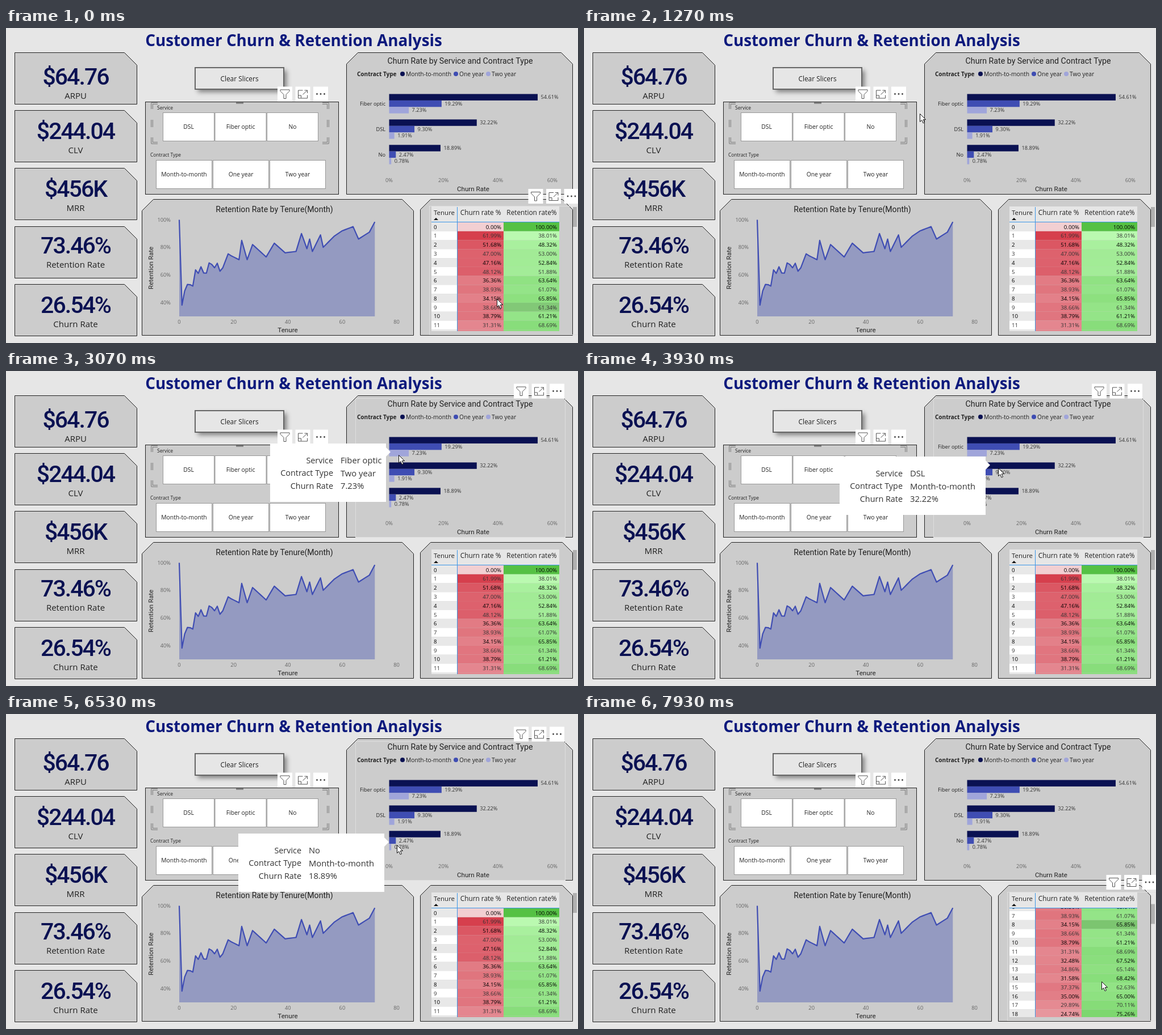
Write an HTML page with a canvas that moves like this. It is 1007x556 px and loops after 8000 ms.

```html
<!DOCTYPE html>
<html lang="en">
<head>
<meta charset="utf-8">
<title>Customer Churn & Retention Analysis</title>
<style>
html, body { margin: 0; width: 100%; height: 100%; overflow: hidden; background: #e6e6e6; }
canvas { display: block; }
</style>
</head>
<body>
<canvas id="stage" width="1007" height="556"></canvas>
<script>
const ctx = document.getElementById('stage').getContext('2d');
const SANS = '"Open Sans", "Noto Sans", sans-serif', DIN = 'Roboto, sans-serif';
const NAVY = '#0a1152', BLUE = '#3f4db3', LILAC = '#a0a5da', PANEL = '#ccc';
const LOOP = 8000, STEP = 1000 / 15;

const services = [
  { name: 'Fiber optic', rates: [54.61, 19.29, 7.23] },
  { name: 'DSL', rates: [32.22, 9.30, 1.91] },
  { name: 'No', rates: [18.89, 2.47, 0.78] }
];
const contracts = ['Month-to-month', 'One year', 'Two year'];
const barColors = [NAVY, BLUE, LILAC];
const bars = { x: 674.5, y: 116.5, scale: 4.788, thick: 11.4, pitch: 44.9 };

// retention % of the months listed in the table
const listed = [100, 38.01, 48.32, 53, 52.84, 51.88, 63.64, 61.07, 65.85, 61.34,
  61.21, 68.69, 67.52, 65.14, 68.42, 62.63, 65, 70.11, 75.26];
// turning points of the later months: month, retention %
const turns = [[18, 75], [22, 71], [23, 85], [25, 71], [27, 82], [32, 73], [35, 83], [39, 76],
  [43, 77], [45, 90], [47, 79], [48, 86], [49, 77], [52, 89], [53, 80], [57, 88], [60, 92],
  [64, 95], [66, 86], [70, 91], [72, 98.5]];
const retention = m => m < listed.length ? listed[m] : along(turns, m)[0];

// cursor path: time, x, y
const path = [[0, 864, 478], [533, 416, 194], [867, 430, 186], [1533, 698, 128], [2000, 698, 128],
  [2200, 691, 131], [2400, 693, 144], [3533, 689, 150], [3933, 729, 171], [4800, 699, 189],
  [5267, 699, 189], [5333, 698, 191], [5733, 706, 217], [6467, 706, 217], [6933, 579, 313],
  [7067, 685, 456], [7467, 911, 472]];
const cursorAt = t => along(path, t).map(Math.round);

// linear interpolation through points of the form [key, ...values]
function along(points, key) {
  const i = points.findIndex(p => p[0] > key);
  if (i < 0) return points[points.length - 1].slice(1);
  const [k0, ...from] = points[i - 1], [k1, ...to] = points[i];
  return from.map((v, j) => v + (to[j] - v) * (key - k0) / (k1 - k0));
}

// y is the middle of the capitals
function text(s, x, y, size, { align = 'center', color = '#222', font = SANS, weight = 400, tracking = 0 } = {}) {
  ctx.font = `${weight} ${size}px ${font}`;
  ctx.letterSpacing = tracking + 'px';
  ctx.textAlign = align;
  ctx.fillStyle = color;
  ctx.fillText(s, x, y + size * 0.357);
}

function rect(x, y, w, h, fill, stroke, line = 1) {
  if (fill) { ctx.fillStyle = fill; ctx.fillRect(x, y, w, h); }
  if (stroke) { ctx.strokeStyle = stroke; ctx.lineWidth = line; ctx.strokeRect(x, y, w, h); }
}

function shape(d, x, y, fill, stroke, line = 1) {
  const outline = new Path2D(d);
  ctx.save();
  ctx.translate(x, y);
  if (fill) { ctx.fillStyle = fill; ctx.fill(outline); }
  if (stroke) { ctx.strokeStyle = stroke; ctx.lineWidth = line; ctx.lineJoin = 'round'; ctx.stroke(outline); }
  ctx.restore();
}

function dot(x, y, r, color) {
  ctx.fillStyle = color;
  ctx.beginPath();
  ctx.arc(x, y, r, 0, Math.PI * 2);
  ctx.fill();
}

function panel(x, y, w, h, cutLeft, cutRight) {
  shape(`M0 ${cutLeft}L${cutLeft} 0H${w - cutRight}L${w} ${cutRight}V${h}H0Z`, x, y, PANEL, '#222');
}

function moreIcon(x, y) {
  rect(x, y, 26, 26, '#fff');
  for (const dx of [-6.5, 0, 6.5]) dot(x + 13 + dx, y + 13, 1.4, '#444');
}

function toolbar(x, y) {
  rect(x, y, 26, 26, '#fff');
  shape('M5 5.5H21V8L15 14V21H11V14L5 8Z', x, y, null, '#555');
  rect(x + 31.5, y, 26, 26, '#fff');
  shape('M13 6.5H5V20.5H21V15M16 6.5H21V11.5M21 6.5L13 14M5 15.5H10V20', x + 31.5, y, null, '#555');
  moreIcon(x + 63, y);
}

function drawCards() {
  const cards = [['$64.76', 'ARPU', 85], ['$244.04', 'CLV', 181], ['$456K', 'MRR', 283],
    ['73.46%', 'Retention Rate', 383], ['26.54%', 'Churn Rate', 488]];
  cards.forEach(([value, label, y], i) => {
    panel(15.5, Math.round(43 + i * 102.2) + 0.5, 215, 91, 0, 22);
    text(value, 122.5, y, 41, { font: DIN, color: NAVY, weight: 500, tracking: -2 });
    text(label, 122.5, y + 35, 15);
  });
}

function buttonRow(labels, x, y, width, pitch) {
  labels.forEach((label, i) => {
    rect(x + i * pitch, y, width, 50, '#fff', '#999');
    text(label, x + i * pitch + width / 2, y + 25, 10.3);
  });
}

function drawSlicers(panelHover) {
  ctx.save();
  ctx.shadowColor = 'rgba(0,0,0,.45)';
  ctx.shadowBlur = 8;
  ctx.shadowOffsetX = ctx.shadowOffsetY = 5;
  rect(333, 70, 156, 38, '#e6e6e6');
  ctx.restore();
  rect(333, 70, 156, 38, null, '#666', 2);
  text('Clear Slicers', 411, 90, 11.9);

  rect(245.5, 130.5, 340, 163, PANEL, panelHover ? '#b4b4b4' : '#222');
  text('Service', 266, 140.5, 8.5, { align: 'left' });
  text('Contract Type', 254, 224.5, 8.4, { align: 'left' });
  buttonRow(services.map(s => s.name).sort(), 276.5, 149.5, 90, 91.5);
  buttonRow(contracts, 264.5, 233.5, 98, 100);

  for (const [color, width] of [['#888', 4], ['#ccc', 1.5]])
    for (const x of [257, 567]) {
      const inward = x < 400 ? 10 : -10;
      shape(`M${inward} 0H0V10M0 29V42M0 60V70H${inward}`, x, 133, null, color, width);
    }
  rect(405, 131, 13, 3, '#888');
  if (panelHover) moreIcon(559, 103);
  toolbar(478, 103.5);
}

function drawBars() {
  const { x, y, scale, thick, pitch } = bars;
  panel(599.5, 43.5, 398, 250, 20, 20);
  text('Churn Rate by Service and Contract Type', 799.5, 58, 14.2, { font: DIN });
  text('Contract Type', 618, 81, 10, { align: 'left', weight: 700 });
  [698, 792, 849].forEach((dotX, i) => {
    dot(dotX, 81, 4, barColors[i]);
    text(contracts[i], dotX + 6, 81, 10.25, { align: 'left' });
  });
  services.forEach(({ name, rates }, row) => {
    const top = y + row * pitch;
    text(name, 668, top + thick * 1.5, 9.2, { align: 'right' });
    rates.forEach((rate, i) => {
      rect(x, top + i * thick, rate * scale, thick, barColors[i]);
      text(rate.toFixed(2) + '%', x + rate * scale + 5.5, top + (i + 0.5) * thick, 9.2, { align: 'left', color: '#333' });
    });
  });
  for (let p = 0; p <= 60; p += 20) text(p + '%', x + p * scale, 268.5, 9.3, { color: '#666' });
  text('Churn Rate', 822.5, 284, 11.6, { font: DIN });
}

function drawLine(marked) {
  const px = m => 305 + m * 4.782, py = r => 338.5 + (100 - r) * 2.43;
  const months = Array.from({ length: 73 }, (_, m) => m);
  const line = 'M' + months.map(m => `${px(m)} ${py(retention(m))}`).join('L');
  panel(239.5, 302.5, 478, 240, 20, 20);
  text('Retention Rate by Tenure(Month)', 472.5, 320, 14.1, { font: DIN });
  shape(`${line}V509H${px(0)}Z`, 0, 0, '#949ac1');
  shape(line, 0, 0, null, BLUE, 2.2);
  for (let p = 40; p <= 100; p += 20) text(p + '%', 290, py(p), 9.3, { align: 'right', color: '#666' });
  for (let m = 0; m <= 80; m += 20) text(m, px(m), 518.5, 9.3, { color: '#666' });
  text('Tenure', 496, 533, 11.6, { font: DIN });
  ctx.save();
  ctx.translate(255, 423.5);
  ctx.rotate(-Math.PI / 2);
  text('Retention Rate', 0, 0, 11.6, { font: DIN });
  ctx.restore();
  if (marked) {
    rect(577, 337, 1, 172, '#777');
    dot(577.5, py(retention(57)), 3.5, BLUE);
  }
}

const mix = (a, b, k) => `rgb(${a.map((v, i) => Math.round(v + (b[i] - v) * k))})`;

function drawTable(scroll, activeRow) {
  const pitch = 15.77;
  panel(729.5, 302.5, 268, 240, 18, 18);
  rect(749, 315, 225, 27, '#e6e6e6');
  text('Tenure', 753, 326, 11.5, { align: 'left' });
  text('Churn rate %', 871.5, 326, 11.8, { align: 'right' });
  text('Retention rate%', 969.5, 326, 11.8, { align: 'right' });
  shape('M0 4L4 0L8 4Z', 753, 335, '#111');

  ctx.save();
  ctx.beginPath();
  ctx.rect(749, 342, 225, 193);
  ctx.clip();
  listed.forEach((keep, i) => {
    const y = 343 + i * pitch - scroll, mid = y + 8.2, churn = 100 - keep;
    const color = i % 2 ? '#333' : '#000';
    rect(749, y, 45, pitch, i % 2 ? '#fff' : '#e8e8e8');
    rect(794, y, 82, pitch, mix([242, 207, 210], [214, 63, 77], churn / 62));
    rect(876, y, 98, pitch, mix([186, 249, 176], [85, 193, 68], (keep - 38) / 62));
    if (i === activeRow) rect(876, y, 98, pitch, 'rgba(0,0,0,.12)');
    text(i, 753, mid, 9.7, { align: 'left', color });
    text(churn.toFixed(2) + '%', 872, mid, 9.7, { align: 'right', color });
    text(keep.toFixed(2) + '%', 970, mid, 9.7, { align: 'right', color });
  });
  ctx.restore();
  rect(749, 342, 225, 1, '#3a96e8');
  rect(794, 316, 1, 219, '#3a96e8');
  rect(998, 316 + scroll * 0.185, 7, 35, '#b0b0b0');
}

// The tooltip names the bar just above the pointer's tip and fades once the pointer leaves the chart.
function drawTooltip(t) {
  const alpha = Math.min(1, (7267 - t) / 600);
  if (t < 1930 || alpha <= 0) return;
  const barY = cursorAt(Math.min(t, 6467))[1] - 6 - bars.y;
  const service = services[Math.floor(barY / bars.pitch)];
  const kind = Math.min(2, Math.floor(barY % bars.pitch / bars.thick));
  const rows = [['Service', service.name], ['Contract Type', contracts[kind]],
    ['Churn Rate', service.rates[kind].toFixed(2) + '%']];
  const [cx, cy] = cursorAt(Math.min(t, 6933));
  ctx.font = `14.75px ${SANS}`;
  ctx.letterSpacing = '0px';
  const width = Math.round(142 + ctx.measureText(contracts[kind]).width);
  const right = cx - 22, left = right - width, top = cy - 20;
  ctx.save();
  ctx.globalAlpha = alpha;
  rect(left, top, width, 103, '#fff');
  shape('M0 7L8 15L0 23Z', right, top, '#fff');
  rows.forEach(([label, value], i) => {
    const y = top + 30 + i * 22.3;
    text(label, left + 111, y, 14.4, { align: 'right', color: '#333' });
    text(value, left + 124, y, 14.75, { align: 'left', color: '#333' });
  });
  ctx.restore();
}

function drawHover([x, y]) {
  const visuals = [
    { l: 615.5, t: 48.5, w: 369, h: 245, iconX: 894, iconY: 22.5 },
    { l: 245.5, t: 314.5, w: 453, h: 227, iconX: 610, iconY: 284 },
    { l: 745.5, t: 314.5, w: 261, h: 227, iconX: 919.5, iconY: 284 }
  ];
  for (const { l, t, w, h, iconX, iconY } of visuals) {
    if (x < l || x > l + w || y < t || y > t + h) continue;
    rect(l, t, w, h, null, '#dedede');
    toolbar(iconX, iconY);
  }
}

function draw(now) {
  const t = Math.floor((now % LOOP + 4) / STEP) * STEP + 0.5;
  const cursor = cursorAt(t);
  rect(0, 0, 1007, 556, '#e6e6e6');
  text('Customer Churn & Retention Analysis', 506.5, 22, 27.8, { weight: 700, color: '#0d1a7d' });
  drawCards();
  drawSlicers(t > 400 && t < 790);
  drawBars();
  drawLine(t > 6930 && t < 7190);
  drawTable(t > 7930 ? 105.4 : 0, t < 130 ? 9 : t > 7400 ? 8 : -1);
  drawHover(cursor);
  drawTooltip(t);
  shape('M0 0V14L3.2 11L5.6 16.4L8 15.3L5.7 10.2L10 10Z', cursor[0] + 0.5, cursor[1] + 0.5, '#fff', '#111');
}

const start = performance.now();
(function loop() {
  draw(performance.now() - start);
  requestAnimationFrame(loop);
})();
</script>
</body>
</html>
```
